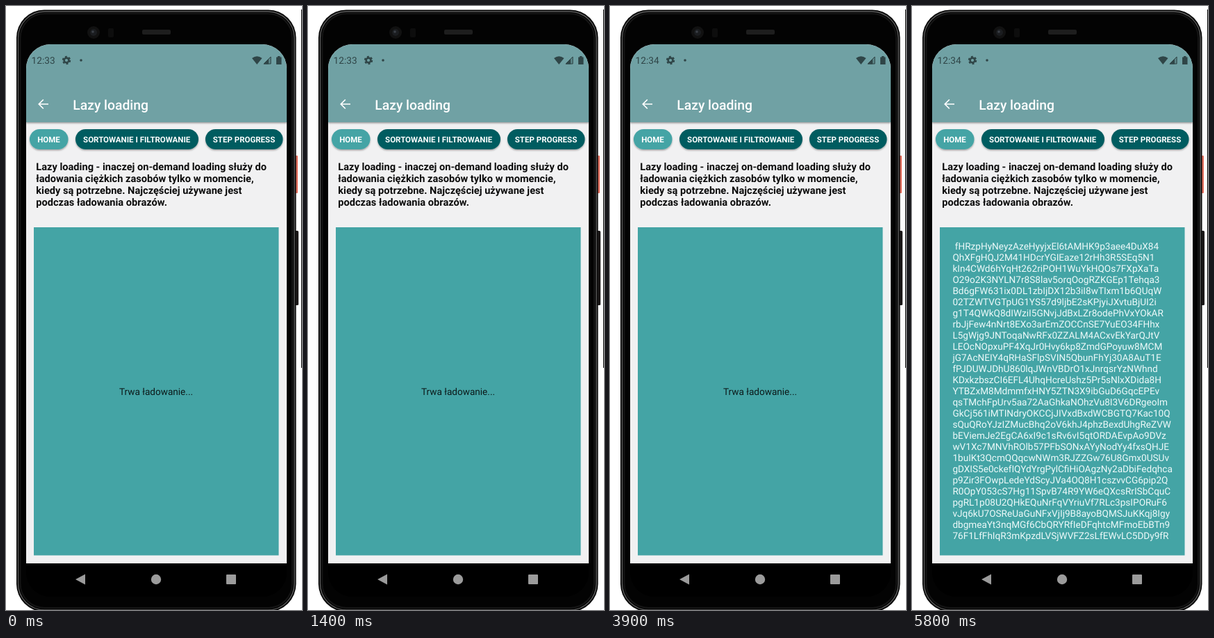
Recreate the animation shown at these times as an HTML page. Size 426x868 px, loop 5.9 s.

```html
<!DOCTYPE html>
<html lang="pl">
<head>
<meta charset="utf-8">
<title>Lazy loading</title>
<style>
html, body { margin: 0; width: 100%; height: 100%; overflow: hidden; background: #fff; }
body { position: relative; font-family: Roboto, sans-serif; text-rendering: geometricPrecision; }
svg, .text { position: absolute; left: 0; top: 0; }
.text { white-space: pre; }
#intro { left: 43.3px; top: 222.5px; font: 700 14.6px/17px Roboto, sans-serif; color: #0c0c0c; }
#content { left: 58.4px; top: 338.3px; font: 400 13.6px/16px Roboto, sans-serif; color: #eefafa; }
.chip { font-weight: 700; font-size: 11.5px; fill: #fff; text-anchor: middle; }
</style>
</head>
<body>
<svg width="426" height="868" viewBox="0 0 426 868">
  <defs>
    <clipPath id="screen"><rect x="29" y="55" width="375" height="794" rx="35"/></clipPath>
    <filter id="shadow" x="-10%" y="-20%" width="120%" height="160%">
      <feDropShadow dx="0" dy="1.5" stdDeviation="1.3" flood-opacity=".35"/>
    </filter>
  </defs>

  <!-- phone body -->
  <path d="M425.5 5V520" stroke="#000"/>
  <rect x="415" y="215" width="5" height="54" rx="1" fill="#e5705f"/>
  <rect x="415" y="323" width="6" height="107" rx="1.5" fill="#1d1a1a"/>
  <rect x="15" y="5.5" width="402.5" height="865" rx="40" fill="#080808"/>
  <rect x="17.5" y="8" width="397.5" height="860" rx="38" fill="#030303" stroke="#5c5c5c" stroke-width="1.4"/>
  <rect x="20.5" y="11" width="391.5" height="854" rx="35" fill="none" stroke="#151515" stroke-width="2"/>
  <circle cx="126" cy="38" r="9" fill="#111"/>
  <circle cx="126" cy="38" r="5" fill="#1b1d20"/>
  <circle cx="125" cy="37" r="1.8" fill="#3b4047"/>
  <rect x="147" y="32" width="8" height="13" rx="2" fill="#0d0d0d"/>
  <rect x="196" y="34" width="41" height="7" rx="2" fill="#1e1e1e"/>

  <g clip-path="url(#screen)">
    <rect x="29" y="55" width="375" height="746" fill="#f1f1f2"/>
    <rect x="29" y="55" width="375" height="112" fill="#6fa1a4" filter="url(#shadow)"/>
    <rect x="29" y="801" width="375" height="50" fill="#000"/>

    <!-- status bar -->
    <g fill="#2f4547">
      <text id="clock" x="36.5" y="83" font-size="13.7"></text>
      <circle cx="87" cy="78" r="3.4" fill="none" stroke="#2f4547" stroke-width="2.6"/>
      <circle cx="87" cy="78" r="5.2" fill="none" stroke="#2f4547" stroke-width="2" stroke-dasharray="2.9 2.545"/>
      <circle cx="108" cy="78" r="1.8"/>
      <path d="M354 75Q361.2 69.5 368.5 75L361.2 84Z"/>
      <path d="M381.5 72.5V83.5H370.5Z" fill-opacity=".3"/>
      <path d="M381 73V83H371Z" fill="none" stroke="#2f4547"/>
      <path d="M378 76V83.5H370.5Z"/>
      <path d="M389 73.5H391V72H394.5V73.5H396.5V84H389Z"/>
    </g>

    <!-- header -->
    <path d="M61 141H47.5M53.8 134.5L47.3 141L53.8 147.5" fill="none" stroke="#fff" stroke-width="1.7"/>
    <text x="96.3" y="148.5" font-size="19.3" font-weight="500" fill="#fff">Lazy loading</text>

    <g filter="url(#shadow)">
      <rect x="34" y="177" width="55.5" height="29" rx="14.5" fill="#45a4a5"/>
      <rect x="100" y="177" width="177" height="29" rx="14.5" fill="#055c60"/>
      <rect x="287" y="177" width="111.5" height="29" rx="14.5" fill="#055c60"/>
    </g>
    <g class="chip">
      <text x="61.5" y="196">HOME</text>
      <text x="188.2" y="196">SORTOWANIE I FILTROWANIE</text>
      <text x="342.5" y="196">STEP PROGRESS</text>
    </g>

    <rect x="40" y="318" width="352.5" height="471.5" fill="#44a4a5"/>
    <text id="loading" x="216" y="559" font-size="13.6" text-anchor="middle" fill="#0c1a1a">Trwa ładowanie...</text>
    <rect id="thumb" x="369.5" y="336.5" width="4" height="8.5" fill="#2e7173"/>

    <!-- navigation bar -->
    <g fill="#9b9b9b">
      <path d="M114 816.5V831.5L100 824Z"/>
      <circle cx="216" cy="824" r="7.2"/>
      <rect x="317" y="817" width="14" height="14" rx="1"/>
    </g>
  </g>
</svg>

<div class="text" id="intro">Lazy loading - inaczej on-demand loading służy do
ładowania ciężkich zasobów tylko w momencie,
kiedy są potrzebne. Najczęściej używane jest
podczas ładowania obrazów.</div>

<div class="text" id="content"> fHRzpHyNeyzAzeHyyjxEl6tAMHK9p3aee4DuX84
QhXFgHQJ2M41HDcrYGIEaze12rHh3R5SEq5N1
kIn4CWd6hYqHt262riPOH1WuYkHQOs7FXpXaTa
O29o2K3NYLN7r8S8lav5orqOogRZKGEp1Tehqa3
Bd6gFW631ix0DL1zbIjDX12b3iI8wTIxm1b6QUqW
02TZWTVGTpUG1YS57d9ljbE2sKPjyiJXvtuBjUI2i
g1T4QWkQ8dIWziI5GNvjJdBxLZr8odePhVxYOkAR
rbJjFew4nNrt8EXo3arEmZOCCnSE7YuEO34FHhx
L5gWjg9JNToqaNwRFx0ZZALM4ACxvEkYarQJtV
LEOcNOpxuPF4XqJr0Hvy6kp8ZmdGPoyuw8MCM
jG7AcNEIY4qRHaSFlpSVIN5QbunFhYj30A8AuT1E
fPJDUWJDhU860lqJWnVBDrO1xJnrqsrYzNWhnd
KDxkzbszCI6EFL4UhqHcreUshz5Pr5sNlxXDida8H
YTBZxM8MdmmfxHNY5ZTN3X9ibGuD6GqcEPEv
qsTMchFpUrv5aa72AaGhkaNOhzVu8I3V6DRgeoIm
GkCj561iMTINdryOKCCjJIVxdBxdWCBGTQ7Kac10Q
sQuQRoYJzIZMucBhq2oV6khJ4phzBexdUhgReZVW
bEViemJe2EgCA6xI9c1sRv6vI5qtORDAEvpAo9DVz
wV1Xc7MNVhROlb57PFbSONxAYyNodYy4fxsQHJE
1buIKt3QcmQQqcwNWm3RJZZGw76U8Gmx0USUv
gDXIS5e0ckefIQYdYrgPylCfiHiOAgzNy2aDbiFedqhca
p9Zir3FOwpLedeYdScyJVa4OQ8H1cszvvCG6pip2Q
R0OpY053cS7Hg11SpvB74R9YW6eQXcsRrISbCquC
pgRL1p08U2QHkEQuNrFqVYriuVf7RLc3psIPORuF6
vJq6kU7OSReUaGuNFxVjIj9B8ayoBQMSJuKKqj8Igy
dbgmeaYt3nqMGf6CbQRYRfIeDFqhtcMFmoEbBTn9
76F1LfFhIqR3mKpzdLVSjWVFZ2sLfEWvLC5DDy9fR</div>

<script>
const LOOP = 5900, MINUTE = 1900, LOADED = 4000, FADE = 4500, FADE_TIME = 250;
const get = id => document.getElementById(id);
const show = (id, on) => { get(id).style.visibility = on ? "visible" : "hidden"; };
const start = performance.now();

function draw(now) {
  const t = Math.max(0, now - start) % LOOP;
  const loaded = t >= LOADED;
  get("clock").textContent = t < MINUTE ? "12:33" : "12:34";
  show("loading", !loaded);
  show("content", loaded);
  show("thumb", loaded);
  get("thumb").style.opacity = Math.min(1, Math.max(0, 1 - (t - FADE) / FADE_TIME));
  requestAnimationFrame(draw);
}
draw(start);
</script>
</body>
</html>
```
